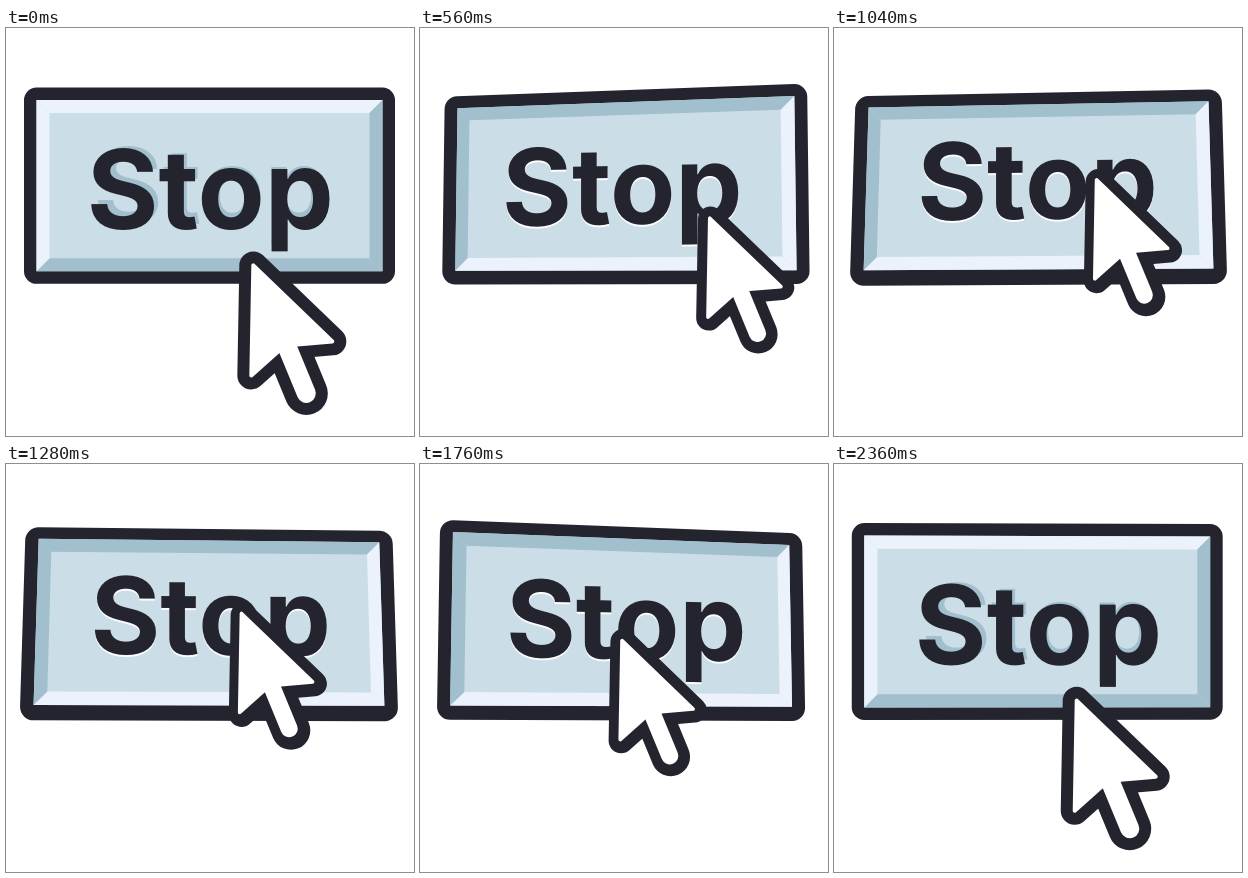
An HTML page with a canvas that plays this animation: 408x408 px, repeating every 2.4 s.

```html
<!DOCTYPE html>
<html lang="en">
<head>
<meta charset="utf-8">
<title>Stop button</title>
<style>
  html, body { margin: 0; width: 100%; height: 100%; overflow: hidden; background: #fff; }
  canvas { display: block; width: 408px; height: 408px; }
</style>
</head>
<body>
<canvas id="stage" width="408" height="408"></canvas>
<script>
const ctx = document.getElementById('stage').getContext('2d');
const LOOP = 2400, STEP = 40, BEVEL = 13;
const INK = '#23242e', FACE = '#cbdde7';
const LIGHT = [235, 242, 251], SHADE = [162, 191, 205];

const mix = (a, b, k) => a + (b - a) * k;
const mixColor = (a, b, k) => `rgb(${a.map((v, i) => Math.round(mix(v, b[i], k))).join(',')})`;

function smoothstep(from, to, v) {
  const k = Math.max(0, Math.min(1, (v - from) / (to - from)));
  return k * k * (3 - 2 * k);
}

// The button leans towards a circling cursor; it is raised only while the cursor is in front.
function poseAt(t) {
  const angle = t / LOOP * 2 * Math.PI;
  const side = Math.sin(angle), front = Math.cos(angle);
  return {
    angle, side, front,
    back: 1 - front,
    raise: smoothstep(0.4, 1, front),
    roll: 0.02 * side * (1 - front / 2)
  };
}

function polygon(points) {
  ctx.beginPath();
  points.forEach(([x, y]) => ctx.lineTo(x, y));
  ctx.closePath();
}

function fillStroke(color, width) {
  ctx.fillStyle = ctx.strokeStyle = color;
  ctx.lineWidth = width;
  ctx.fill();
  ctx.stroke();
}

function drawButton({ side, front, back, raise, roll }) {
  const halfW = 173 - 3.5 * side * side;
  const halfH = 84 + 1.6 * front;
  const project = (u, v) => {
    const depth = 1 + 0.035 * side * u / halfW + 0.0075 * back * v / halfH;
    return [203.5 - 3.5 * side + u * depth, 157.7 + v * depth - roll * u];
  };
  const corners = inset => [[-1, -1], [1, -1], [1, 1], [-1, 1]]
    .map(([x, y]) => project(x * (halfW - inset), y * (halfH - inset)));
  const outer = corners(0), inner = corners(BEVEL);

  polygon(outer.map(([x, y]) => [x, y + back]));
  fillStroke(INK, 25 + back);
  polygon(outer);
  ctx.fillStyle = FACE;
  ctx.fill();

  // top, right, bottom, left: lit from the top left when raised, reversed when pressed
  [raise, 1 - raise, 1 - raise, raise].forEach((lit, i) => {
    const j = (i + 1) % 4;
    polygon([outer[i], outer[j], inner[j], inner[i]]);
    ctx.fillStyle = mixColor(SHADE, LIGHT, lit);
    ctx.fill();
  });
}

function drawLabel({ side, front, raise, roll }) {
  ctx.save();
  ctx.transform(1, -roll, 0, 1, 204.3 - 2 * side, 195.5 + 5 * front);
  ctx.textAlign = 'center';
  const label = (color, size, x, y) => {
    ctx.font = `700 ${size}px Inter, sans-serif`;
    ctx.fillStyle = color;
    ctx.fillText('Stop', x, y);
  };
  const size = 106.7 + 3 * raise;
  label(mixColor([250, 252, 254], SHADE, raise), size * (1 - 0.04 * raise),
    2 * raise, mix(2, -4.5, raise));
  label(INK, size, 0, 0);
  ctx.restore();
}

function drawCursor({ angle, back, raise }) {
  const arrow = [[1, 3], [-1, 113], [27, 88], [45, 82], [80, 79]];
  const layer = (color, grow, shift) => {
    ctx.save();
    ctx.translate(shift, shift);
    polygon(arrow);
    fillStroke(color, 4 + grow);
    ctx.beginPath();
    ctx.moveTo(35, 85);
    ctx.lineTo(54, 131);
    ctx.lineWidth = 19 + grow;
    ctx.stroke();
    ctx.restore();
  };
  const swing = angle - 0.05;
  const scale = 0.9 + 0.1 * raise;
  ctx.save();
  ctx.translate(245 + 44 * Math.sin(angle + 0.03),
    185.5 + 44 * Math.cos(swing) + 5 * Math.cos(2 * swing));
  ctx.scale(scale, scale);
  layer(INK, 24, back);
  layer('#fff', 0, 0);
  ctx.restore();
}

function draw(now) {
  const pose = poseAt(Math.floor(now % LOOP / STEP) * STEP);
  ctx.fillStyle = '#fff';
  ctx.fillRect(0, 0, 408, 408);
  ctx.lineJoin = ctx.lineCap = 'round';
  drawButton(pose);
  drawLabel(pose);
  drawCursor(pose);
}

const start = performance.now();
function tick() {
  draw(performance.now() - start);
  requestAnimationFrame(tick);
}
tick();
</script>
</body>
</html>
```
